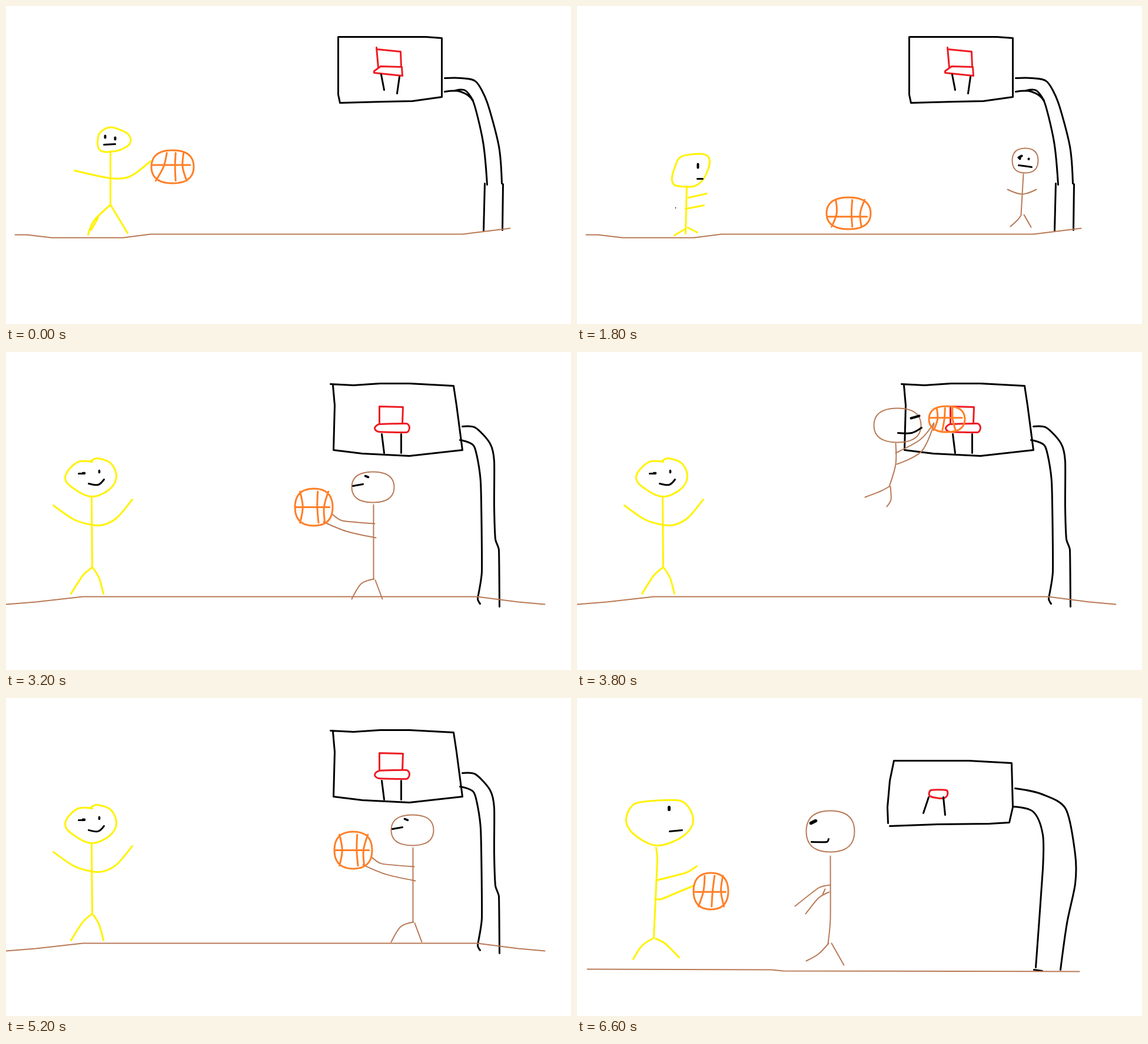
An HTML page that plays this animation: 960x540 px, repeating every 6800 ms.

```html
<!DOCTYPE html>
<html lang="en">
<head>
<meta charset="utf-8">
<title>Hoops</title>
<style>
html, body { margin: 0; width: 100%; height: 100%; overflow: hidden; background: #fff; }
svg { display: block; }
path { fill: none; stroke-linecap: round; stroke-linejoin: round; vector-effect: non-scaling-stroke; }
.bubble { fill: #fff; stroke: #000; stroke-width: 4.7; }
text { font-family: "Open Sans", "Noto Sans", sans-serif; letter-spacing: 2px; }
</style>
</head>
<body>
<svg id="stage" width="960" height="540"></svg>
<script>
const LOOP = 6800;

// Smooth curve through key points; handles never outgrow the shorter neighbour.
function smooth(p, closed) {
  const n = p.length;
  const at = i => closed ? p[(i + n) % n] : p[Math.max(0, Math.min(n - 1, i))];
  const gap = (a, b) => Math.hypot(b[0] - a[0], b[1] - a[1]);
  const handle = (i, side) => {
    const a = at(i - 1), b = at(i), c = at(i + 1);
    const reach = side * Math.min(gap(a, b), gap(b, c)) / 3 / (gap(a, c) || 1);
    return b.map((v, k) => v + (c[k] - a[k]) * reach);
  };
  let d = "M" + p[0];
  for (let i = 0; i < n - !closed; i++) d += `C${handle(i, 1)} ${handle(i + 1, -1)} ${at(i + 1)}`;
  return d;
}

// Strokes are split by ";". Prefix "-" keeps corners, "o" closes the curve.
function trace(stroke) {
  const mode = stroke[0];
  const p = stroke.replace(/^[-o]/, "").split(" ").map(s => s.split(",").map(Number));
  return mode === "-" ? "M" + p.join("L") : smooth(p, mode === "o");
}
const pen = (color, base) => (strokes, width = base) =>
  `<path stroke="${color}" stroke-width="${width}" d="${strokes.split(";").map(trace).join("")}"/>`;
const ink = pen("#000", 3);
const yellow = pen("#fff200", 3);
const brown = pen("#b97a57", 2);
const orange = pen("#ff7f27", 3);
const red = pen("#ed1c24", 3);

const move = (x, y, art) => `<g transform="translate(${x} ${y})">${art}</g>`;

// Slightly boxy hand-drawn oval
function ring(cx, cy, rx, ry) {
  const bulge = v => Math.sign(v) * Math.abs(v) ** 0.85;
  const points = Array.from({ length: 12 }, (_, i) => {
    const a = i * Math.PI / 6;
    return `${cx + rx * bulge(Math.cos(a))},${cy + ry * bulge(Math.sin(a))}`;
  });
  return "o" + points.join(" ");
}

// Each rib runs from a top to a bottom fraction of the width.
function ball(x, y, w, h, ribs = [[0.37, 0.12], [0.57, 0.57], [0.75, 0.82]], seam = 0.45) {
  const seamLine = `${x + w * 0.05},${y + h * seam} ${x + w * 0.9},${y + h * seam}`;
  const lines = ribs.map(([top, low]) => {
    const mid = (top + low) / 2;
    const bow = mid + (0.5 - mid) * 0.2;
    return `${x + w * top},${y + h * 0.1} ${x + w * bow},${y + h / 2} ${x + w * low},${y + h * 0.9}`;
  });
  return orange([ring(x + w / 2, y + h / 2, w / 2 - 1.5, h / 2 - 1.5), seamLine, ...lines].join(";"));
}

// Speech
const say = (text, x, y, size, weight = 500) =>
  `<text x="${x}" y="${y}" font-size="${size}" font-weight="${weight}">${text}</text>`;
const bubble = d => `<path class="bubble" d="${d}"/>`;
const oval = (cx, cy, rx, ry, tail) =>
  bubble(`M${cx - rx} ${cy}a${rx} ${ry} 0 1 1 ${2 * rx} 0a${rx} ${ry} 0 1 1 ${-2 * rx} 0z`) + bubble("M" + tail);
function box(x, y, w, h, tail, drop = 10, r = 13) {
  const turn = (dx, dy) => `a${r} ${r} 0 0 1 ${dx} ${dy}`;
  return bubble(`M${x + r} ${y}h${w - 2 * r}${turn(r, r)}v${h - 2 * r}${turn(-r, r)}` +
    `H${tail + 16}L${tail} ${y + h + drop}L${tail - 15} ${y + h}H${x + r}${turn(-r, -r)}v${2 * r - h}${turn(r, -r)}z`);
}

const request = oval(600, 190, 72, 29, "580,217 585,230 606,219") + say("Can I try?", 545, 197, 20, 300);
const reply = oval(239, 212, 66, 27, "199,234 202,246 225,238") + say("Surp", 189, 223, 31, 300);
const praise = box(141, 98, 122, 66, 166) + say("Nice!", 163, 141, 30);
const thanks = box(608, 217, 121, 71, 642) + say("Thanks", 615, 249, 27) + say("bro", 625, 279, 31);
const offer = box(650, 206, 130, 60, 672) + say("Here bro", 659, 243, 24);
const gratitude = box(118, 89, 163, 77, 163) + say("Oh", 132, 124, 28) + say("thanks!", 159, 159, 28);

// Courts
const court = (board, pole, ground, rim, net) => ink(board) + ink(pole) + brown(ground) + red(rim) + ink(net);
const court1 = court(
  "-564,52 713,52 740,54 740,154 690,161 640,162 567,164 564,150 564,52",
  "745,122 773,122 798,128 817,163 837,238 842,301;844,302 843,380;745,145 772,145 793,161 810,230 817,303;813,301 811,381;763,143 780,143 793,160",
  "-15,388 35,388 77,393 198,393 245,387 775,387 856,377",
  "629,70 632,104;-630,73 670,77 671,103;-625,110 636,102 672,103 673,118 625,113 625,110",
  "637,116 642,142;668,120 664,148");
const court2 = court(
  "-551,54 590,56 635,53 685,53 760,57 765,90 775,166 685,176 605,172 556,166 558,90 555,56",
  "775,126 797,128 822,155 829,185 829,262 831,317 837,336 838,432;771,149 795,160 806,220 808,372 801,418 805,427",
  "-0,428 50,424 130,415 800,415 870,424 915,428",
  "-634,121 634,92 674,93 673,121;o634,122 680,121 685,128 680,136 633,135 626,129",
  "638,139 642,171;671,139 671,171");
const court3 = court(
  "-531,217 612,214 700,213 734,211 740,185 738,110 665,106 538,106 531,140 527,185 528,212",
  "744,153 790,163 830,188 846,265 846,315 832,382 821,461;741,184 775,193 791,232 791,290 779,457;776,461 790,463",
  "-17,460 330,461 350,463 853,464",
  "o601,156 627,156 628,166 618,170 599,166",
  "597,168 588,195;622,168 625,198");

// Yellow player
const ready = yellow("o156,222 166,209 182,206 207,217 210,233 190,245 160,245;177,246 177,336") +
  yellow("116,279 177,292 210,289 245,263;177,337 149,364 139,388;156,359 144,380;177,337 206,385") +
  ink("168,220 168,223;185,223 185,226", 4) + ink("166,235 185,234");

const sideHead = yellow("o161,290 172,259 190,252 222,255 219,285 200,305 166,304") +
  ink("205,268 205,274", 4) + ink("204,293 213,293");
const raised = move(-4, -62, sideHead) + yellow("183,245 184,350");
const windUp = raised + yellow("184,275 215,300 243,312;184,290 212,318 243,330;184,350 163,388;184,350 194,388");
const shoot = raised + yellow("184,275 210,262 226,248;184,290 212,278 232,262;184,350 163,388;184,350 203,386");
const watch = sideHead + yellow("186,306 184,386;189,325 220,318;184,344 215,338;185,377 165,389;188,376 204,384");
const speck = ink("167,342 167,342.5", 1.5);

const standing = yellow("146,186 120,187 100,213 120,235 147,245 175,233 187,212 178,189 155,180 143,185") +
  yellow("145,247 146,365;146,365 130,379 110,410;148,367 158,384 165,410");
const cheer = standing + yellow("80,260 115,284 145,293 165,293 188,281 214,250") +
  ink("123,206 133,206;140,223 156,225 166,216") + ink("130,205 133,205;158,201 158,204", 3.6);
const reach = standing + yellow("148,285 165,282 190,269 210,263 225,249;148,302 165,300 239,269;144,293 144,309") +
  ink("157,201 166,198", 4) + ink("163,218 184,218");

const holder = yellow("o83,205 100,178 175,174 197,205 180,234 135,250 95,230;134,254 136,275 130,406") +
  yellow("135,309 185,296 203,285;132,341 143,341 198,318;130,407 110,420 95,443;133,408 150,417 173,440") +
  ink("156,185 156,189", 5) + ink("157,226 178,224");

// Brown player
const arrive = brown(ring(761, 262, 22, 21) + ";758,285 754,354;731,311 756,319 780,311") +
  brown("754,355 748,363 736,374;759,354 771,375") +
  ink("750,257 755,254;752,259 752,256;767,259 767,259.5", 4) + ink("750,270 772,273");

const ask = brown(ring(582, 246, 22, 17) + ";580,265 578,300 565,371;541,299 553,314 570,321;548,307 558,319") +
  brown("575,321 595,317 615,306;540,383 566,373;569,371 591,387") +
  ink("570,240 580,241;574,250 592,252") + ink("586,240 594,240", 4);

const dunk = brown(ring(544, 124, 40, 29) + ";541,155 541,190 530,228;541,171 583,148 606,120") +
  brown("543,190 585,168 606,122;530,228 515,236 489,246;532,228 533,250 526,262") +
  ink("567,112 581,108", 4) + ink("545,137 568,137 585,128") +
  ball(596, 90, 64, 47, [[0.23, 0.15], [0.45, 0.38], [0.65, 0.73]]);
const leap = (x, y, sx, sy) =>
  `<g transform="translate(${x} ${y}) scale(${sx} ${sy}) translate(-488 -88)">${dunk}</g>`;

const landed = brown(ring(562, 221, 28, 25) + ";562,249 557,340 557,382;509,289 528,317 558,324 575,314 590,279") +
  brown("556,384 540,391 525,412;542,391 538,398;562,387 583,424") +
  ink("543,212 560,212;574,212 574,219;551,229 577,231") + ink("551,215 558,214", 4.5);

const give = brown(ring(600, 223, 36, 26) + ";601,253 601,379;603,285 548,280 530,268;605,309 555,298 516,282") +
  brown("602,379 580,387 564,413;604,381 616,413") +
  ink("587,204 592,206", 3.6) + ink("566,221 583,218") +
  move(0, 0, "");
const carry = give + ball(466, 224, 67, 66, [[0.15, 0.15], [0.6, 0.62], [0.87, 0.78]], 0.5);

const done = brown(ring(430, 226, 41, 35) + ";430,268 430,375 426,417;430,317 410,322 370,353") +
  brown("428,329 410,339 388,366;417,333 421,324;427,416 410,434 389,446;432,416 453,453") +
  ink("397,212 405,208", 5.5) + ink("398,244 424,244 427,239");

// Scenes
const open = court1 + shoot;
const rest = court1 + watch;
const asking = rest + ball(422, 323, 78, 57, [[0.22, 0.13], [0.58, 0.58], [0.85, 0.78]], 0.6) + ask;
const party = court2 + cheer;
const late = art => move(0, 0.9, court2 + art);

const steps = [
  [0, court1 + ready + ball(245, 243, 75, 59)],
  [200, court1 + windUp + ball(238, 288, 69, 58)],
  [400, open + ball(223, 200, 74, 64)],
  [600, open + ball(270, 171, 79, 62)],
  [800, open + ball(448, 139, 55, 47)],
  [1000, open + ball(572, 84, 54, 47)],
  [1200, rest + ball(642, 121, 41, 40)],
  [1400, rest + ball(643, 196, 45, 45)],
  [1600, rest + ball(617, 326, 72, 58)],
  [1800, rest + speck + ball(422, 323, 78, 57, [[0.22, 0.13], [0.58, 0.58], [0.85, 0.78]], 0.6) + arrive],
  [2000, asking],
  [2200, asking + request],
  [2700, asking + reply],
  [3200, party + move(23, 6, carry)],
  [3400, party + leap(355, 171, 0.86, 1.37)],
  [3600, party + leap(416, 132, 0.92, 1.17)],
  [3800, party + dunk],
  [4000, party + landed + ball(632, 200, 60, 56)],
  [4200, party + landed + ball(632, 360, 60, 56) + praise],
  [4700, party + landed + ball(738, 309, 57, 54, [[0.33, 0.26], [0.58, 0.58], [0.77, 0.87]], 0.67) + thanks],
  [5200, late(cheer + move(90, 0, carry))],
  [5400, late(cheer + carry + offer)],
  [5900, late(reach + carry) + gratitude],
  [6400, late(reach + give + ball(330, 344, 68, 61))],
  [6600, court3 + holder + ball(196, 295, 62, 65, [[0.33, 0.16], [0.6, 0.52], [0.83, 0.86]], 0.52) + done]
];

const stage = document.getElementById("stage");
stage.innerHTML = steps.map(([, art]) => `<g style="display:none" transform="translate(0.5 0.5)">${art}</g>`).join("");
const cels = [...stage.children];
let shown = 0;
cels[0].style.display = "";

const begin = performance.now();
function tick() {
  const t = (performance.now() - begin) % LOOP;
  let n = steps.length - 1;
  while (steps[n][0] > t) n--;
  if (n !== shown) {
    cels[shown].style.display = "none";
    cels[n].style.display = "";
    shown = n;
  }
  requestAnimationFrame(tick);
}
tick();
</script>
</body>
</html>
```
